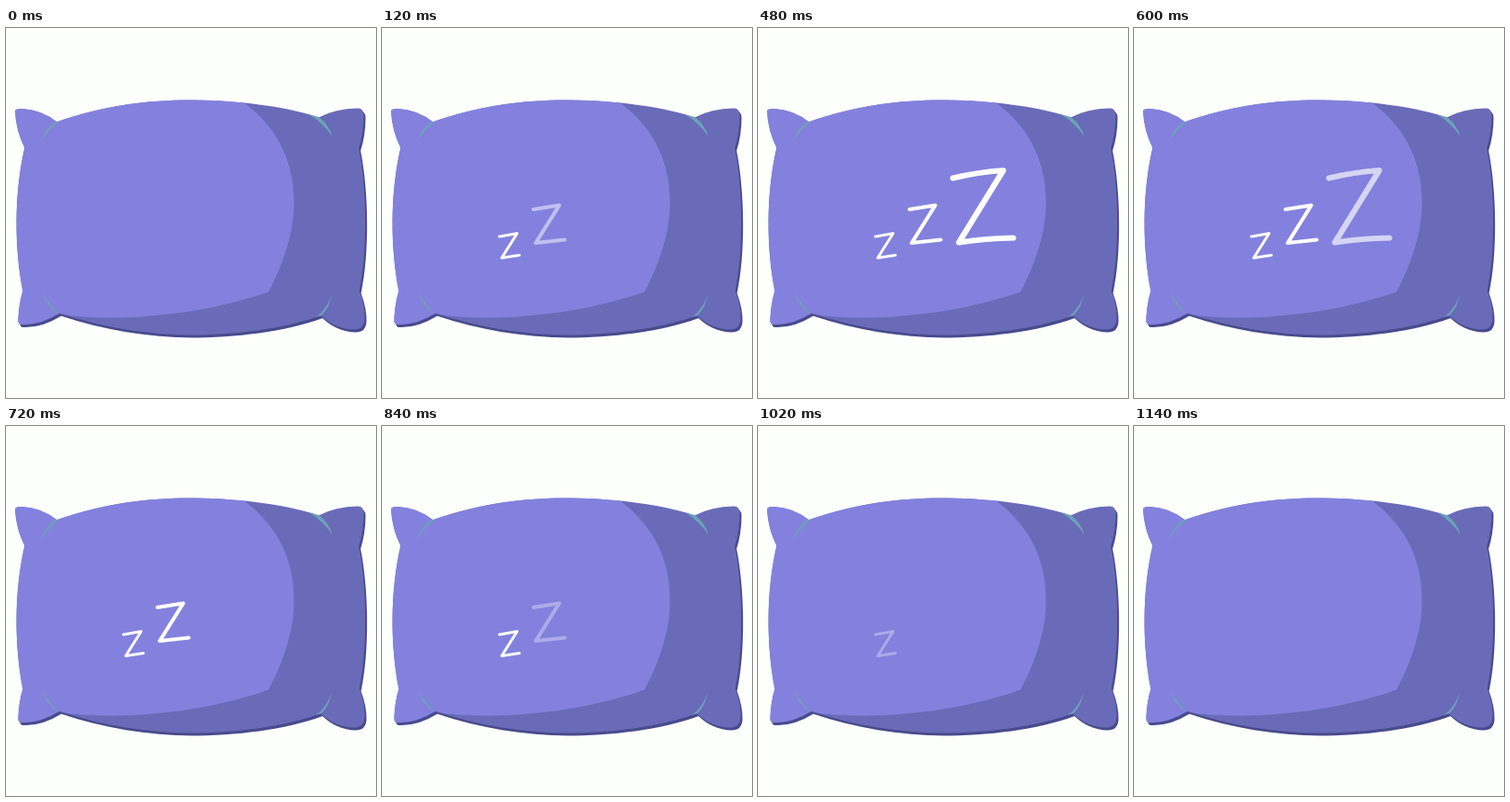
These frames come from a looping animation (408 by 408 pixels, 1.26 s). An HTML page with a canvas:

```html
<!DOCTYPE html>
<html lang="en">
<head>
<meta charset="utf-8">
<title>Sleepy pillow</title>
<style>
html, body { margin: 0; width: 100%; height: 100%; overflow: hidden; background: #fdfffc; }
canvas { display: block; width: 100vw; height: 100vh; }
</style>
</head>
<body>
<canvas id="stage" width="408" height="408"></canvas>
<script>
const ctx = document.getElementById('stage').getContext('2d');
const LOOP = 1260, STEP = 60, LAST = 1140;

const outline = new Path2D(`M10 92 Q10 89 17 89 Q39 90 56 103.5
  C108 85 160 79.5 200 79.5 C250 79.5 303 85 345 98.5 Q363 89 388 88.5
  Q394.5 88.5 394.5 96 Q394.5 115 389 132.5 C398 177 399 246 389.5 289.5
  Q396 307 395.5 321 Q394.5 333 383 332.5 Q363 332 347 317
  C306 332 250 338.5 203 338.5 C155 338 105 330 59 314.5
  Q37 328 17 327 Q13 327 13.5 321 Q14 305 18.5 290
  C9 240 9 182 20.5 132 Q11 113 10 92 Z`);

// Everything left of the curved shade is lit, ears included.
const lit = new Path2D(`M0 70 L256 70 L263 83
  C304 113 318 154 317.5 195 Q317 238 289.5 291 C218 316 128 325 60 316
  L52 340 L0 340 Z`);

const creases = new Path2D(`M64 99 L56 102.5 Q43 111 38 126 Q46 111 64 99 Z
  M334 95 L345 98 Q356 107 360 120 Q351 106 334 95 Z
  M40 292 Q45 308 60 317 Q50 308 40 292 Z
  M359 294 Q355 309 341 319.5 L347 318 Q357 308 359 294 Z`);

// Each letter appears in turn, then fades away in the opposite order.
const letters = [
  { d: 'M129.5 230 L149 226.5 L132 253.5 L151.5 250.5', w: 3, from: 0, to: 900 },
  { d: 'M167 200 L195.5 195.5 L169.5 237 L201.5 233.5', w: 4.2, from: 80, to: 720 },
  { d: 'M215 165.5 Q242 159 270.5 157 L221.5 236.5 Q251 232 281.5 231.5', w: 6.2, from: 160, to: 540 }
].map(z => ({ ...z, path: new Path2D(z.d) }));

const clamp = v => Math.max(0, Math.min(1, v));

function fill(path, color) {
  ctx.fillStyle = color;
  ctx.fill(path);
}

function drawPillow() {
  ctx.save();
  ctx.translate(2, 3);
  fill(outline, '#484b8c');
  ctx.restore();

  fill(outline, '#6a6bb8');
  ctx.save();
  ctx.clip(outline);
  fill(lit, '#8381dd');
  fill(creases, '#6ba3b7');
  ctx.restore();
}

function draw(t) {
  ctx.globalAlpha = 1;
  ctx.fillStyle = '#fdfffc';
  ctx.fillRect(0, 0, 408, 408);
  drawPillow();

  ctx.strokeStyle = '#fff';
  ctx.lineCap = ctx.lineJoin = 'round';
  for (const z of letters) {
    ctx.globalAlpha = Math.min(clamp((t - z.from) / 80), clamp(1 - (t - z.to) / 180));
    ctx.lineWidth = z.w;
    ctx.stroke(z.path);
  }
}

function tick() {
  const t = performance.now() % LOOP;
  draw(Math.min(Math.floor(t / STEP) * STEP, LAST));
  requestAnimationFrame(tick);
}
tick();
</script>
</body>
</html>
```
